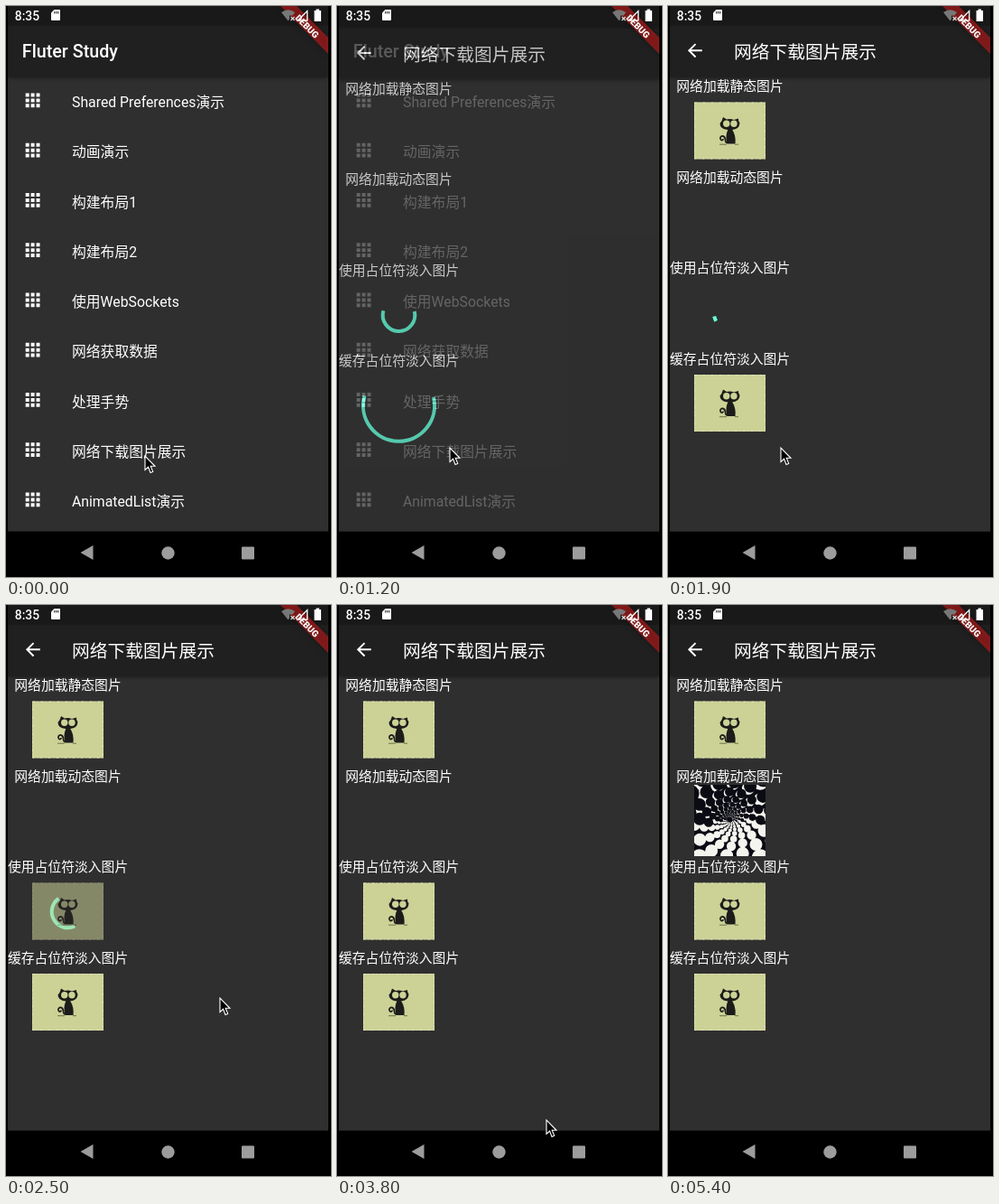
Write an HTML page that moves like this. It is 360x632 px and loops after 5500 ms.

```html
<!DOCTYPE html>
<html lang="zh-CN">
<head>
<meta charset="utf-8">
<title>Fluter Study</title>
<style>
  html, body { margin: 0; height: 100%; overflow: hidden; background: #000; }
  svg { display: block; width: 360px; height: 632px; }
  text { fill: #fff; font-family: Roboto, "Noto Sans CJK SC", "Noto Sans CJK", sans-serif; }
  .title { font-size: 19.75px; }
  .item { font-size: 15.8px; }
  .label { font-size: 14.8px; }
  .bar { fill: #202020; filter: drop-shadow(0 1px 2px #0008); }
  .ribbon { fill: #b71c1ca8; filter: drop-shadow(0 0 3px #0008); }
  .arc { fill: none; stroke: #64ffda; stroke-width: 4; }
</style>
</head>
<body>
<svg viewBox="0 0 360 632">
  <defs>
    <clipPath id="screen"><path d="M2 0H357V581.5H2z"/></clipPath>
    <clipPath id="square"><path d="M-39.5-39.5h79v79h-79z"/></clipPath>
    <g id="bg">
      <path d="M2 0H357V582H2z" fill="#2f2f2f"/>
      <path class="bar" d="M2 0H357V78H2z"/>
      <path d="M2 0H357V22H2z" fill="#191919"/>
    </g>
    <g id="cat">
      <path d="M0 0h79v63h-79z" fill="#ccd296"/>
      <path d="M.5.5h78v62h-78z" fill="none" stroke="#e2e6c6" stroke-width=".8" stroke-dasharray="3 2 1 3"/>
      <g fill="#1c1c1a">
        <path d="M32 16.5L36 19Q40 18 44 19.5L49 18Q48.500 20 50.500 23Q50 30 42 30.500H37Q28.500 29.500 28.500 23.500Q31 21 32 16.500z"/>
        <path d="M37.500 30Q34 37 36.500 46H45.500Q46.500 37 42 30z"/>
        <path d="M28 46.700h8M45 46.700h4" stroke="#55583c" stroke-width=".8"/>
        <path d="M37 45Q34.500 45 34.500 41Q33.500 37 30.500 37.500Q27.500 39.500 30 42Q32 42.500 32 40.500" fill="none" stroke="#1c1c1a" stroke-width="1.700"/>
      </g>
      <g fill="#ccd296"><circle cx="35.700" cy="23.700" r="3.700"/><circle cx="44" cy="23.700" r="3.700"/></g>
    </g>
  </defs>

  <g clip-path="url(#screen)">
    <use href="#bg"/>
    <text class="title" x="17.800" y="56.500" font-weight="500">Fluter Study</text>
    <g id="list"></g>

    <g id="page">
      <use href="#bg"/>
      <path transform="translate(18 37.500) scale(.9875)" fill="#fff"
        d="M20 11H7.830l5.590-5.590L12 4l-8 8 8 8 1.410-1.410L7.830 13H20v-2z"/>
      <text class="title" x="73" y="58">网络下载图片展示</text>
      <g class="label">
        <text x="9.300" y="94">网络加载静态图片</text>
        <text x="9.300" y="194.500">网络加载动态图片</text>
        <text x="2" y="295">使用占位符淡入图片</text>
        <text x="2" y="395.500">缓存占位符淡入图片</text>
      </g>
      <use id="still" href="#cat" x="29" y="106.500"/>
      <g id="vortex" transform="translate(68.500 238.500)" clip-path="url(#square)">
        <path d="M-40-40h80v80h-80z" fill="#0b0b14"/>
        <path id="light" fill="#f4f4ee"/>
        <path id="dark" fill="#0b0b14"/>
      </g>
      <path id="small" class="arc" transform="translate(68.500 339.500)"/>
      <use id="faded" href="#cat" x="29" y="307.500"/>
      <path id="large" class="arc" transform="translate(68.500 439.700)"/>
      <use id="cached" href="#cat" x="29" y="408"/>
    </g>

    <path class="ribbon" d="M304 0H322L357 35V53z"/>
    <text transform="translate(333.500 22.500) rotate(45)" y="3.600" text-anchor="middle" font-size="10" font-weight="900">DEBUG</text>
  </g>

  <text x="9.800" y="15.500" font-size="13.800" font-weight="500">8:35</text>
  <g fill="#fff">
    <path d="M53.500 4H59Q60 4 60 5V15Q60 16 59 16H51Q50 16 50 15V7.500z"/>
    <path d="M53.700 6v2.500M55.700 6v2.500M57.700 6v2.500" stroke="#191919"/>
    <path d="M305 7Q312.500 1.500 320 7L317.500 10.500H314V14.500L312.500 16.500z" fill="#777"/>
    <path d="M315.500 12l4 4m0-4l-4 4" stroke="#ddd" stroke-width="1.200"/>
    <path d="M323 16.200L333.700 5.500V16.200z" fill="none" stroke="#fff" stroke-width="1.300"/>
    <path d="M343.500 3.500h3.500v1.500h2v12h-7.500v-12h2z"/>
  </g>
  <g fill="#9c9c9c">
    <path d="M82.500 605L96.500 597V613z"/>
    <circle cx="179.500" cy="605.500" r="7.200"/>
    <rect x="261" y="598.500" width="14" height="14" rx="1"/>
  </g>
  <path id="cursor" d="M0 0V15.500L3.600 12.300L6 18.500L8.700 17.400L6.200 11.300H11z" fill="#000" stroke="#fff" stroke-width="1.100"/>
</svg>
<script>
const LOOP = 5500, STEP = 100;
const $ = id => document.getElementById(id);
const clamp = v => Math.min(1, Math.max(0, v));
const ramp = (t, a, b) => clamp((t - a) / (b - a));
const show = (id, opacity) => $(id).setAttribute('opacity', opacity);

function bezier(x1, y1, x2, y2) {
  const at = (a, b, s) => 3 * (1 - s) * s * ((1 - s) * a + s * b) + s ** 3;
  return x => {
    let lo = 0, hi = 1;
    for (let i = 0; i < 24; i++) {
      const mid = (lo + hi) / 2;
      if (at(x1, x2, mid) < x) lo = mid; else hi = mid;
    }
    return at(y1, y2, lo);
  };
}
const fastOutSlowIn = bezier(.4, 0, .2, 1);
const easeIn = bezier(.42, 0, 1, 1);

// Linear interpolation through rows of [time, ...values].
function track(keys, t) {
  const i = Math.max(1, keys.findIndex(k => k[0] >= t));
  const [a, b] = keys.at(-1)[0] < t ? [keys.at(-1), keys.at(-1)] : [keys[i - 1], keys[i]];
  const f = a === b ? 0 : ramp(t, a[0], b[0]);
  return a.slice(1).map((v, n) => v + (b[n + 1] - v) * f);
}
const pointer = [[0, 154, 498], [600, 125, 489], [2200, 125, 489], [2500, 237, 435],
  [3400, 237, 435], [3800, 232, 570], [3900, 232, 610], [4300, 232, 636]];
const turns = [[900, 0], [1200, .25], [1900, 1.075], [2500, 1.65], [2900, 2.04]];

const items = ['Shared Preferences演示', '动画演示', '构建布局1', '构建布局2', '使用WebSockets',
  '网络获取数据', '处理手势', '网络下载图片展示', 'AnimatedList演示'];
const dots = [0, 6, 12].map(y => [0, 6, 12].map(x => `M${x} ${y}h4v4h-4z`).join('')).join('');
$('list').innerHTML = items.map((label, i) => `<g transform="translate(0 ${i * 55.25})">
  <path fill="#fff" transform="translate(21.7 96.500) scale(.9875)" d="${dots}"/>
  <text class="item" x="73" y="112">${label}</text></g>`).join('');

// Indeterminate progress arc: the head grows, then the tail catches up.
function arc(r, turn) {
  const n = Math.floor(turn), p = turn - n;
  const head = fastOutSlowIn(clamp(p * 2)), tail = fastOutSlowIn(clamp(p * 2 - 1));
  const start = Math.PI * (-.5 + 1.5 * tail + 1.7 * p - .8 * n);
  const sweep = Math.max(.001, 1.5 * Math.PI * (head - tail));
  const pt = a => `${r * Math.cos(a)} ${r * Math.sin(a)}`;
  return `M${pt(start)}A${r} ${r} 0 ${+(sweep > Math.PI)} 1 ${pt(start + sweep)}`;
}

// Rings of discs whose shading is deeper towards the top.
function vortex(spin) {
  const disc = (x, y, r) => `M${x - r} ${y}a${r} ${r} 0 1 0 ${2 * r} 0a${r} ${r} 0 1 0 ${-2 * r} 0`;
  let light = '', dark = '';
  for (let k = 0; k < 10; k++) {
    const R = 54 * .74 ** k;
    for (let i = 0; i < 14; i++) {
      const a = i * Math.PI / 7 + k * .31 + spin;
      const x = R * Math.cos(a), y = R * Math.sin(a) - 1, r = R * .175;
      light += disc(x, y, r);
      if (y < R * .25) {
        const d = r * (.35 + .8 * (1 + Math.sin(a)));
        dark += disc(x + d * .7, y - d * .7, r);
      }
    }
  }
  $('light').setAttribute('d', light);
  $('dark').setAttribute('d', dark);
}

function draw(t) {
  const p = ramp(t, 950, 1250);
  show('page', easeIn(p));
  $('page').setAttribute('transform', `translate(0 ${158 * (1 - fastOutSlowIn(p))})`);

  const [turn] = track(turns, t);
  $('small').setAttribute('d', arc(17.8, turn));
  $('large').setAttribute('d', arc(39.5, turn));
  show('small', +(t < 2770));
  show('large', 1 - ramp(t, 1400, 2000));

  show('still', +(t >= 1500));
  show('cached', ramp(t, 1400, 1800));
  show('faded', ramp(t, 2170, 2770));
  show('vortex', +(t >= 5200));
  if (t >= 5200) vortex((t - 5400) / 1500);

  const [x, y] = track(pointer, t);
  $('cursor').setAttribute('transform', `translate(${x} ${y})`);
  show('cursor', +(t < 4300));
}

const begin = performance.now();
function tick() {
  const t = (performance.now() - begin) % LOOP;
  draw(Math.floor(t / STEP) * STEP);
  requestAnimationFrame(tick);
}
tick();
</script>
</body>
</html>
```
